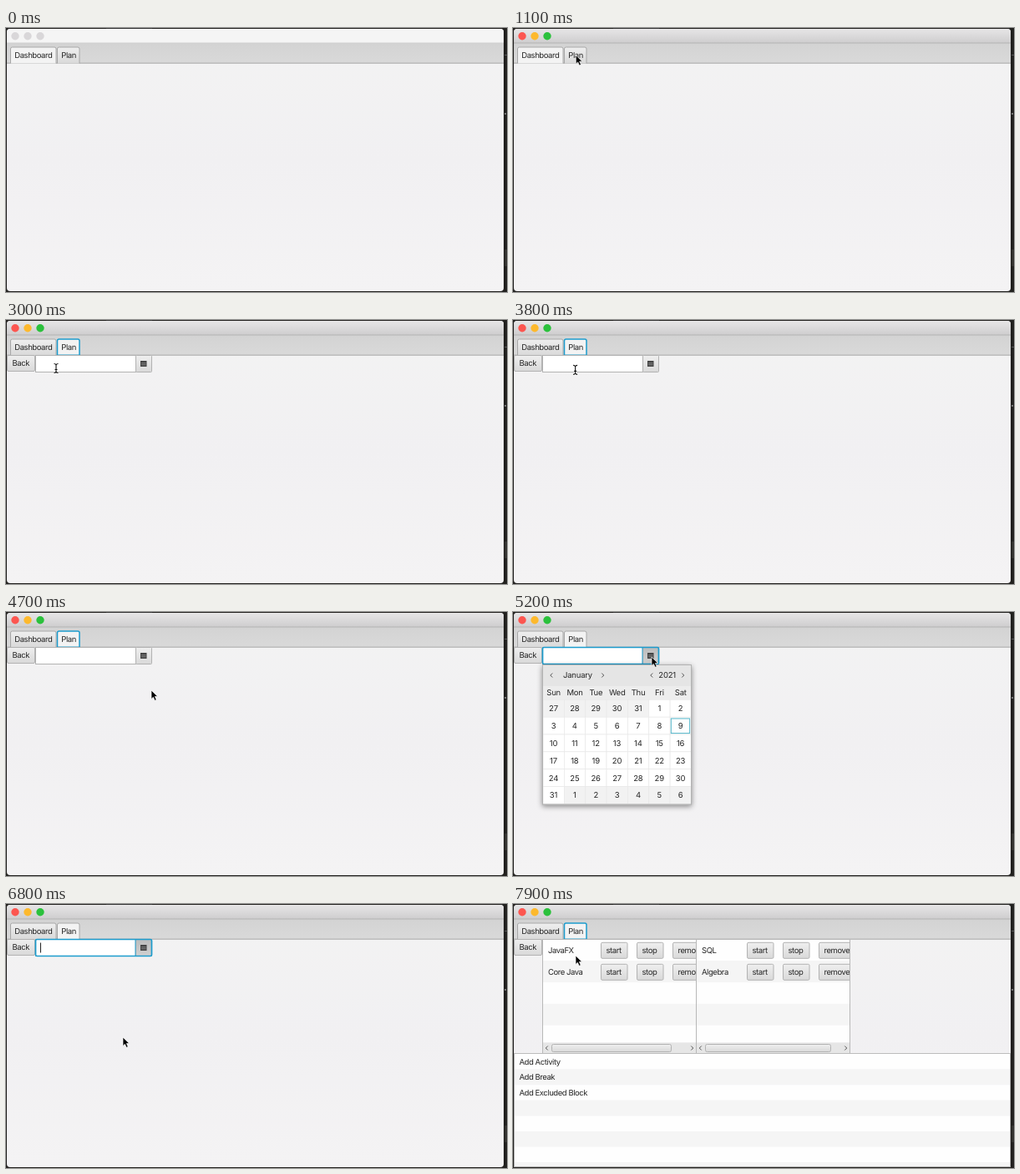
Recreate the animation shown at these times as an HTML page. Size 600 by 317 pixels, loop 8000 ms.

```html
<!DOCTYPE html>
<html lang="en">
<head>
<meta charset="utf-8">
<title>Day planner</title>
<style>
  html, body { margin: 0; width: 100%; height: 100%; overflow: hidden; background: #22211f; }
  svg { display: block; }
  text { font: 9.5px Inter, Roboto, sans-serif; letter-spacing: -.45px; fill: #262626; text-rendering: geometricPrecision; }
  .mid { text-anchor: middle; letter-spacing: -.2px; }
</style>
</head>
<body>
<svg width="600" height="317" viewBox="0 0 600 317">
  <defs>
    <linearGradient id="title" x2="0" y2="1"><stop stop-color="#e7e6e7"/><stop offset="1" stop-color="#cecdce"/></linearGradient>
    <linearGradient id="bar" x2="0" y2="1"><stop stop-color="#d3d3d3"/><stop offset="1" stop-color="#d9d9d9"/></linearGradient>
    <linearGradient id="btn" x2="0" y2="1"><stop stop-color="#efefef"/><stop offset="1" stop-color="#d9d9d9"/></linearGradient>
    <linearGradient id="hot" x2="0" y2="1"><stop stop-color="#f8f8f8"/><stop offset="1" stop-color="#e6e6e6"/></linearGradient>
    <linearGradient id="down" x2="0" y2="1"><stop stop-color="#bcbcbc"/><stop offset="1" stop-color="#d0d0d0"/></linearGradient>
    <linearGradient id="page" x2="0" y2="1"><stop stop-color="#f3f3f3"/><stop offset=".5" stop-color="#f1f0f2"/><stop offset="1" stop-color="#f4f3f4"/></linearGradient>
    <filter id="shadow" x="-10%" y="-10%" width="120%" height="125%"><feDropShadow dx="0" dy="2" stdDeviation="3" flood-opacity=".45"/></filter>
  </defs>
  <g id="stage"></g>
</svg>
<script>
const LOOP = 8000, BLUE = '#1c9ccd', EDGE = '#b2b2b2';
const ACTIVE = 1100, PLAN = 1300, PICKER = 2800, OPEN = 5200, CLOSE = 6500, LISTS = 7000;

// time, x, y of the pointer tip
const PATH = [
  [100, 262, 232], [900, 76, 33], [1400, 74, 32], [1900, 51, 52], [2000, 50, 51], [2500, 52, 54],
  [3000, 60, 58], [3600, 61, 57], [4500, 169, 80], [4700, 174, 94], [5000, 166, 53], [5400, 166, 55],
  [5900, 139, 160], [6000, 138, 161], [6800, 140, 160], [7100, 140, 160], [7700, 78, 66], [7900, 75, 62]
];

const rect = (x, y, w, h, fill, stroke = 'none', more = '') =>
  `<rect x="${x}" y="${y}" width="${w}" height="${h}" fill="${fill}" stroke="${stroke}" ${more}/>`;
const text = (x, y, s, mid) => `<text x="${x}" y="${y + 3.4}"${mid ? ' class="mid"' : ''}>${s}</text>`;
const line = (d, stroke, width = 1) => `<path d="${d}" fill="none" stroke="${stroke}" stroke-width="${width}"/>`;
const arrow = (x, y, dir, size = 2.5) =>
  line(`M${x - dir * size / 2} ${y - size}l${dir * size} ${size}l${-dir * size} ${size}`, '#555');
const button = (x, y, w, s, fill = 'url(#btn)') =>
  rect(x + .5, y + .5, w - 1, 19, fill, EDGE, 'rx="1.5"') + text(x + 6.5, y + 10, s);

function pointerAt(t) {
  const i = PATH.findIndex(k => k[0] > t);
  if (i < 0) return PATH[PATH.length - 1].slice(1);
  const [t0, x0, y0] = PATH[i - 1], [t1, x1, y1] = PATH[i];
  const u = (t - t0) / (t1 - t0), e = u * u * (3 - 2 * u);
  return [x0 + (x1 - x0) * e, y0 + (y1 - y0) * e];
}

function pointer(x, y, beam) {
  if (beam) {
    const d = `M${x - 2.5} ${y - 5.5}q2 0 2.5 1.5q.5 -1.5 2.5 -1.5M${x} ${y - 4}v8M${x - 2.5} ${y + 5.5}q2 0 2.5 -1.5q.5 1.5 2.5 1.5M${x - 1.5} ${y + 1.5}h3`;
    return line(d, '#fff', 2.4) + line(d, '#111', 1.1);
  }
  return `<path d="M${x} ${y}v10.5l2.4 -2.2l1.8 4l2 -.9l-1.8 -3.9h3.3z" fill="#000" stroke="#fff" stroke-width=".7"/>`;
}

function tab(x, w, s, selected, focused) {
  const fill = selected ? '#f3f3f3' : 'url(#btn)';
  const shape = `M${x + .5} 42.5V25q0 -2 2 -2h${w - 5}q2 0 2 2V42.5`;
  return `<path d="${shape}" fill="${fill}" stroke="${focused ? BLUE : '#a8a8a8'}" stroke-width="${focused ? 1.5 : 1}"/>` +
    (focused ? line(`M${x} 42h${w}`, BLUE) : '') + text(x + 5.3, 33, s);
}

function frame(t) {
  const active = t >= ACTIVE, plan = t >= PLAN;
  const lights = active ? ['#fc5650', '#fdb92d', '#2bc13c'] : Array(3).fill('#d9d7d9');
  return rect(0, 0, 600, 317, '#22211f') + rect(597, 266, 3, 20, '#33322f') +
    rect(597, 102, 2, 2, '#777') + rect(597, 32, 3, 1, '#555') + rect(120, 0, 55, 1, '#333') +
    rect(1, 1, 595, 315, 'url(#page)', 'none', 'rx="4"') +
    `<path d="M1 18V5q0 -4 4 -4H592q4 0 4 4V18z" fill="${active ? 'url(#title)' : '#f5f5f5'}"/>` +
    lights.map((c, i) => `<circle cx="${11 + 15 * i}" cy="9.7" r="4.7" fill="${c}"/>`).join('') +
    rect(1, 18, 595, 24, 'url(#bar)') + line('M1 18H596', active ? '#b3b3b3' : '#d0d0d0') +
    line('M1 42.2H596', '#a6a6a6') +
    tab(5, 55.5, 'Dashboard', !plan) +
    tab(61, 27.5, 'Plan', plan, plan && (t < OPEN || t >= LISTS));
}

function picker(t, x, y) {
  const focus = t >= OPEN, over = x > 155 && x < 175 && y < 63;
  let s = button(1, 42, 34, 'Back') +
    rect(35.5, 42.5, 120, 20, '#fff', EDGE) +
    rect(155.5, 42.5, 19, 20, focus ? 'url(#down)' : over ? 'url(#hot)' : 'url(#btn)', EDGE, 'rx="1"') +
    rect(161, 49, 7.5, 7, '#444') + line('M162 51.8h5.5M162 53.8h5.5', '#aaa', .6);
  if (focus) s += rect(35.5, 42.5, 139, 20, 'none', BLUE, 'rx="1.5" stroke-width="1.7"') + line('M155 43v19', BLUE);
  if (t >= CLOSE) s += line('M41.5 46.5v12', '#222');
  return s;
}

function calendar(t, x, y) {
  const W = 25.35, H = 20.85, L = 36, T = 105.3;
  let s = rect(35.5, 63.5, 178, 167.5, '#fff', EDGE, 'filter="url(#shadow)"') +
    rect(36, 64, 177.5, 25, '#e5e5e5') + rect(36, 89, 177.5, 16.3, '#ededed') +
    arrow(46, 76, -1) + text(77.5, 76, 'January', 1) + arrow(107.5, 76, 1) +
    arrow(166, 76, -1) + text(184.7, 76, '2021', 1) + arrow(203.5, 76, 1);
  ['Sun', 'Mon', 'Tue', 'Wed', 'Thu', 'Fri', 'Sat'].forEach((d, i) => s += text(L + W * (i + .5), 97, d, 1));
  const hover = Math.floor((x - L) / W) + 7 * Math.floor((y - T) / H);
  for (let i = 0; i < 42; i++) {
    const cx = L + W * (i % 7), cy = T + H * Math.floor(i / 7), n = i - 4;
    const inside = n > 0 && n < 32, picked = n === 14 && t >= 5900;
    const fill = picked ? '#0a89c2' : i === hover && y > T && t < 5900 ? '#dcdcdc' : inside ? '#fff' : '#f2f2f2';
    s += rect(cx, cy, W, H, fill, picked ? 'none' : '#e8e8e8', 'stroke-width=".7"');
    if (n === 9) s += rect(cx + 1.2, cy + 1.8, W - 3, H - 3.2, 'none', '#52b5c9');
    const label = text(cx + W / 2 - .2, cy + 10.4, n < 1 ? n + 31 : n > 31 ? n - 31 : n, 1);
    s += picked ? label.replace('<text', '<text style="fill:#fff"') : label;
  }
  return s + rect(35.5, 63.5, 178, 167.5, 'none', EDGE);
}

function stripes(h, step, w) {
  let s = '';
  for (let i = 0; i * step < h; i++) s += rect(0, i * step, w, step, i % 2 ? '#f5f5f5' : '#fefefe');
  return s;
}

function taskList(x, names, col, thumb) {
  const rows = names.map((n, i) => {
    const y = 3.3 + 26 * i;
    return text(6, y + 10, n) + button(col, y, 32.5, 'start') + button(col + 43, y, 32.5, 'stop') +
      button(col + 86, y, 45, 'remove');
  }).join('');
  return `<svg x="${x}" y="42.5" width="183.5" height="124">${stripes(124, 25.8, 184)}${rows}</svg>` +
    rect(x, 166.5, 183.5, 13, '#e6e6e6') +
    rect(x + 10.5, 168.5, thumb, 9, 'url(#btn)', EDGE, 'rx="2"') +
    arrow(x + 4.5, 173, -1) + arrow(x + 178.5, 173, 1) +
    rect(x - .5, 42.5, 184, 137, 'none', '#b8b8b8');
}

function lists() {
  return button(1, 42, 34, 'Back') +
    taskList(36, ['JavaFX', 'Core Java'], 69, 143) +
    taskList(220, ['SQL', 'Algebra'], 60, 150) +
    `<svg x="1" y="180" width="594.5" height="135.5">${stripes(135, 18.6, 595)}</svg>` +
    rect(1.5, 179.5, 594, 136, 'none', '#bcbcbc') +
    ['Add Activity', 'Add Break', 'Add Excluded Block'].map((s, i) => text(7.5, 189.3 + 18.6 * i, s)).join('');
}

function draw(t) {
  let s = frame(t);
  if (t < 100) return s;
  const [x, y] = pointerAt(t), dated = t >= PICKER && t < LISTS;
  if (t >= LISTS) s += lists();
  else if (dated) s += picker(t, x, y);
  else if (t >= PLAN) {
    const over = x < 67 && y > 42;
    s += button(1, 42, 66, 'Add new day', over ? t >= 2600 ? 'url(#down)' : 'url(#hot)' : 'url(#btn)') +
      button(67, 42, 105.5, 'Add day from template');
  }
  if (t >= OPEN && t < CLOSE) s += calendar(t, x, y);
  return s + pointer(x, y, dated && x > 35 && x < 155 && y < 63);
}

const stage = document.getElementById('stage');
const start = performance.now();
let shown = -1;
function tick() {
  const t = Math.floor((performance.now() - start) % LOOP / 100) * 100;
  if (t !== shown) stage.innerHTML = draw(shown = t);
  requestAnimationFrame(tick);
}
tick();
</script>
</body>
</html>
```
